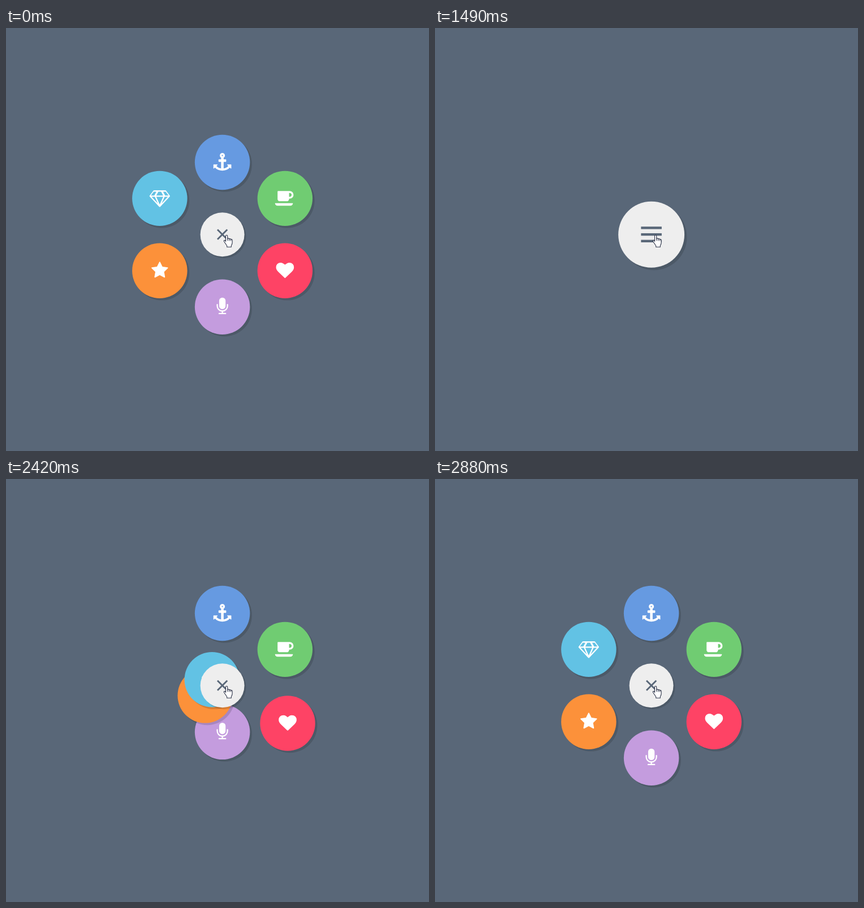
Write an HTML page with a canvas that moves like this. It is 748x748 px and loops after 3310 ms.

```html
<!DOCTYPE html>
<html lang="en">
<head>
<meta charset="utf-8">
<title>Radial menu</title>
<style>
  html, body { margin: 0; width: 100%; height: 100%; overflow: hidden; background: #596778; }
  canvas { display: block; width: 748px; height: 748px; }
</style>
</head>
<body>
<canvas id="stage" width="748" height="748"></canvas>
<script>
const ctx = document.getElementById('stage').getContext('2d');

const LOOP = 3310;
const SLATE = '#596778';
const CENTER = { x: 382.6, y: 365.3 };
const UNIT = 1.218;              // menu pixels to stage pixels
const RADIUS = 40 * UNIT;
const REACH = 105 * UNIT;
const ICON_SCALE = 0.01767;

// The picture refreshes only at these moments
const TICKS = [
  0, 1100, 1150, 1190, 1240, 1290, 1340, 1390, 1440, 1490,
  2130, 2180, 2230, 2280, 2320, 2370, 2420, 2450, 2500, 2550, 2600, 2650,
  2700, 2750, 2790, 2840, 2880
];
const CLOSE = { items: 1051, lines: 1051, button: 1060 };
const OPEN = { items: 2129, lines: 2121, button: 2121 };

function bezier(x1, y1, x2, y2) {
  const at = (a, b, s) => 3 * (1 - s) * (1 - s) * s * a + 3 * (1 - s) * s * s * b + s * s * s;
  return x => {
    if (x <= 0) return 0;
    if (x >= 1) return 1;
    let lo = 0, hi = 1;
    for (let i = 0; i < 24; i++) {
      const mid = (lo + hi) / 2;
      if (at(x1, x2, mid) < x) lo = mid; else hi = mid;
    }
    return at(y1, y2, lo);
  };
}
const linear = x => Math.max(0, Math.min(1, x));
const ease = bezier(0.25, 0.1, 0.25, 1);
const easeOut = bezier(0, 0, 0.58, 1);
const backOut = bezier(0.175, 0.885, 0.32, 1.275);
const spring = bezier(0.935, 0, 0.34, 1.33);

// Joins a right half with its mirror image around x = axis
function mirrored(half, axis) {
  const right = new Path2D(half), path = new Path2D();
  path.addPath(right);
  path.addPath(right, new DOMMatrix([-1, 0, 0, 1, 2 * axis, 0]));
  return path;
}

const anchor = mirrored('M896 0q106 0 181 75t75 181q0 70-35 128.5t-93 92.5v163h192q26 0 45 19t19 45v128' +
  'q0 26-19 45t-45 19h-192v647q149-20 271.5-82.5t189.5-153.5l-100-100q-15-16-7-35 8-20 30-20h352' +
  'q14 0 23 9t9 23v352q0 22-20 30-8 2-12 2-12 0-23-9l-93-93q-119 143-318.5 226.5t-429.5 83.5' +
  'V320q26 0 45-19t19-45-19-45-45-19z', 896);
const cup = new Path2D('M1664 576q0-80-56-136t-136-56h-64v384h64q80 0 136-56t56-136z' +
  'M0 1408h1792q0 106-75 181t-181 75h-1280q-106 0-181-75t-75-181z' +
  'M1856 576q0 159-112.5 271.5t-271.5 112.5h-64v32q0 92-66 158t-158 66h-704q-92 0-158-66t-66-158v-736' +
  'q0-26 19-45t45-19h1152q159 0 271.5 112.5t112.5 271.5z');
const heart = mirrored('M896 1664q26 0 44-18l623-600q229-229 229-450 0-220-127-344t-351-124' +
  'q-62 0-126.5 21.5t-120 58-95.5 68.5-76 68z', 896);
const mic = mirrored('M896 0q132 0 226 94t94 226v512q0 132-94 226t-226 94z' +
  'M1472 704v128q0 221-147.5 384.5t-364.5 187.5v132h256q26 0 45 19t19 45-19 45-45 19H896V1280' +
  'q185 0 316.5-131.5t131.5-316.5V704q0-26 19-45t45-19 45 19 19 45z', 896);
const star = mirrored('M896 32q30 0 49 41l225 455 502 73q56 9 56 46 0 22-26 48l-363 354 86 500' +
  'q1 7 1 20 0 21-10.5 35.5t-30.5 14.5q-19 0-40-12l-449-236z', 896);
const gem = mirrored('M1024 128h576q33 0 51 26l384 512q14 18 13 41.5t-17 40.5l-960 1024q-18 20-47 20' +
  'V1540l349-772h-349v-128h342l-204-384h-138z' +
  'M1213 1433l623-665h-323zM1563 640h346l-288-384h-262z', 1024);

// In stacking order, clockwise from the top
const ITEMS = [
  { color: '#669ae1', icon: anchor, mid: 896 },
  { color: '#70cc72', icon: cup, mid: 1000 },
  { color: '#fe4365', icon: heart, mid: 896 },
  { color: '#c49cde', icon: mic, mid: 896 },
  { color: '#fc913a', icon: star, mid: 896 },
  { color: '#62c2e4', icon: gem, mid: 1024 }
];

const hand = new Path2D('M388.5 377.5V367.8a1.6 1.6 0 0 1 3.2 0v5q.1-.9 1.4-.9 1.5 0 1.6 1.3.3-.6 1.3-.6' +
  ' 1.5 0 1.6 1.4.3-.4 1-.4 1.5 0 1.5 1.7v4q0 2.5-1.2 4.4l-.6 1v2.5h-7.6v-2.2q-1-1.2-2.2-3.2' +
  'l-2.7-4q-1-1.6.1-2.3 1.1-.5 2.2.8z');
const knuckles = new Path2D('M391.7 372.5v3.6M394.7 373.2v3.2M397.6 374v2.6');

function disc(x, y, r, color) {
  ctx.fillStyle = color;
  ctx.beginPath();
  ctx.arc(x, y, r, 0, Math.PI * 2);
  ctx.fill();
}

function raisedDisc(x, y, scale, color) {
  const drop = 3 * UNIT * scale;
  disc(x + drop, y + drop, RADIUS * scale, 'rgba(0,0,0,0.14)');
  disc(x, y, RADIUS * scale, color);
}

function drawItem(item, index, out) {
  const angle = index * Math.PI / 3;
  const x = CENTER.x + Math.sin(angle) * REACH * out;
  const y = CENTER.y - Math.cos(angle) * REACH * out;
  raisedDisc(x, y, 1, item.color);
  ctx.save();
  ctx.translate(x, y - 16.5);
  ctx.scale(ICON_SCALE, ICON_SCALE);
  ctx.translate(-item.mid, 0);
  ctx.fillStyle = '#fff';
  ctx.fill(item.icon, 'evenodd');
  ctx.restore();
}

function drawLine(shift, angle, stretch) {
  ctx.save();
  ctx.translate(0, shift);
  ctx.rotate(angle);
  ctx.fillRect(-12.5 * stretch, -1.5, 25 * stretch, 3);
  ctx.restore();
}

function drawButton(scale, cross) {
  raisedDisc(CENTER.x, CENTER.y, scale, '#eee');
  ctx.save();
  ctx.translate(CENTER.x, CENTER.y - 0.2);
  ctx.scale(UNIT * scale, UNIT * scale);
  ctx.fillStyle = SLATE;
  drawLine(-8 * (1 - cross), cross * Math.PI / 4, 1);
  drawLine(0, 0, 1 - 0.9 * cross);
  drawLine(8 * (1 - cross), -cross * Math.PI / 4, 1);
  ctx.restore();
}

function drawHand() {
  ctx.fillStyle = '#fff';
  ctx.fill(hand);
  ctx.strokeStyle = '#2b3247';
  ctx.lineWidth = 1.1;
  ctx.lineJoin = 'round';
  ctx.stroke(hand);
  ctx.stroke(knuckles);
}

function pose(t) {
  if (t < TICKS[1]) return { out: () => 1, cross: 1, scale: 0.8 };
  if (t < 2130) {
    const out = 1 - easeOut((t - CLOSE.items) / 200);
    return {
      out: () => out,
      cross: 1 - ease((t - CLOSE.lines) / 200),
      scale: 0.8 + 0.4 * backOut((t - CLOSE.button) / 400)
    };
  }
  return {
    out: i => spring((t - OPEN.items) / (180 + 100 * i)),
    cross: ease((t - OPEN.lines) / 200),
    scale: 1.2 - 0.4 * linear((t - OPEN.button) / 200)
  };
}

function draw(time) {
  const t = TICKS.filter(tick => tick <= time).pop();
  const { out, cross, scale } = pose(t);
  ctx.fillStyle = SLATE;
  ctx.fillRect(0, 0, 748, 748);
  ITEMS.forEach((item, i) => drawItem(item, i, out(i)));
  drawButton(scale, cross);
  drawHand();
}

const start = performance.now();
function loop() {
  draw((performance.now() - start) % LOOP);
  requestAnimationFrame(loop);
}
loop();
</script>
</body>
</html>
```
